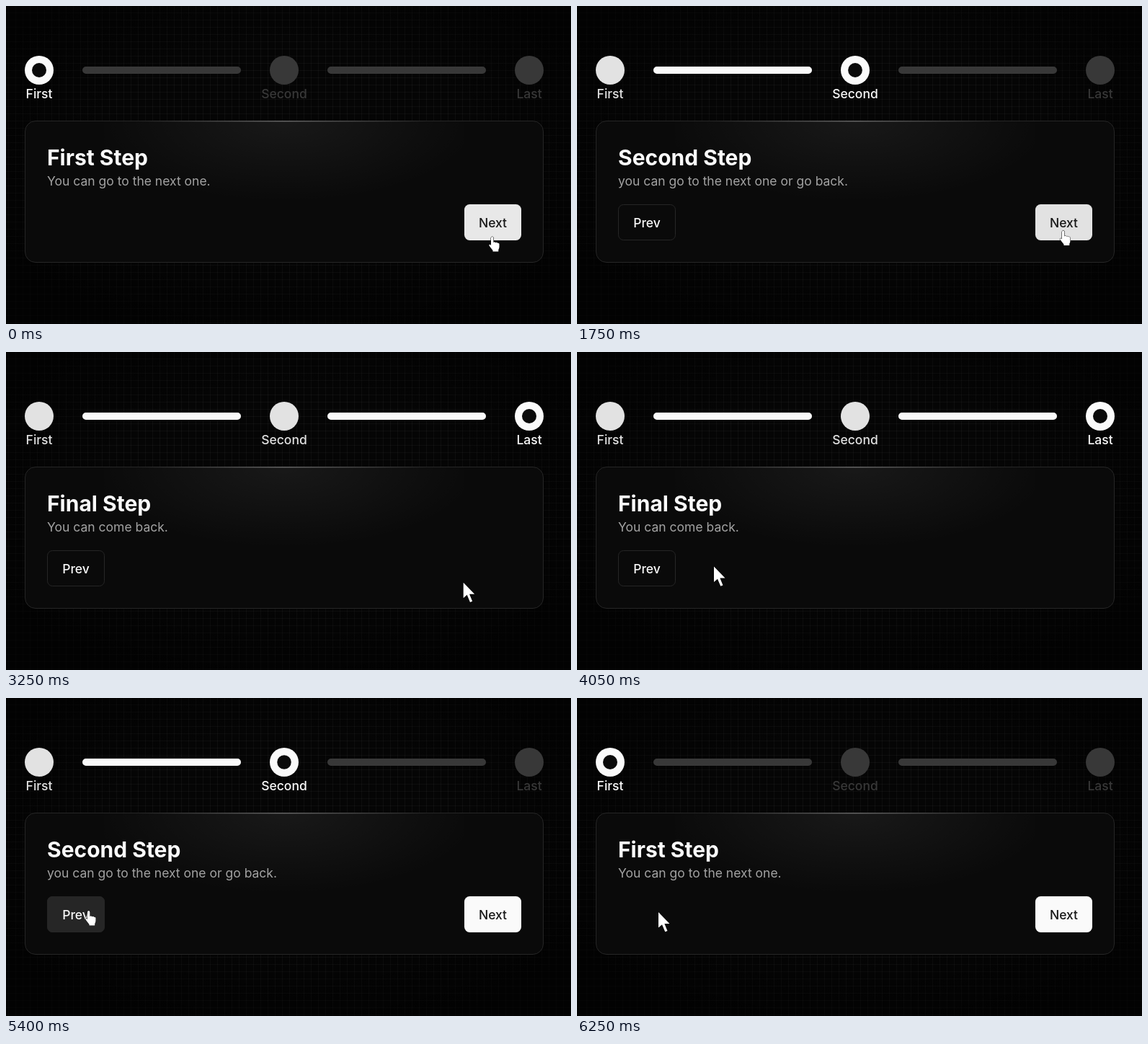
An HTML page that plays this animation: 784 px wide and 441 px high, repeating every 6.3 s.

```html
<!DOCTYPE html>
<html lang="en">
<head>
<meta charset="utf-8">
<title>Stepper</title>
<style>
html, body { margin: 0; width: 100%; height: 100%; overflow: hidden; background: #050505; }
svg { display: block; width: 784px; height: 441px; }
text { font-family: Inter, sans-serif; font-size: 17.5px; white-space: pre; }
.label { text-anchor: middle; font-weight: 500; }
.button text { text-anchor: middle; font-weight: 500; }
#title { font-size: 30px; font-weight: 700; fill: #fafafa; }
#sub { fill: #a3a3a3; }
#cursor path { fill: #fff; stroke: #000; stroke-width: 1; stroke-linejoin: round; paint-order: stroke; }
</style>
</head>
<body>
<svg viewBox="0 0 784 441">
  <defs>
    <pattern id="grid" width="10" height="10" patternUnits="userSpaceOnUse">
      <path d="M3.5 0V10M0 9.5H10" stroke="#fff" stroke-opacity=".035"/>
    </pattern>
    <radialGradient id="shade" cx=".5" cy=".45" r=".62">
      <stop offset=".5" stop-color="#000" stop-opacity="0"/>
      <stop offset="1" stop-color="#000" stop-opacity=".65"/>
    </radialGradient>
    <radialGradient id="glow" gradientUnits="userSpaceOnUse" cx="0" cy="0" r="1"
      gradientTransform="translate(386 160) scale(270 112)">
      <stop offset="0" stop-color="#fff" stop-opacity=".06"/>
      <stop offset="1" stop-color="#fff" stop-opacity="0"/>
    </radialGradient>
    <linearGradient id="shine">
      <stop offset="0" stop-color="#fff" stop-opacity="0"/>
      <stop offset=".5" stop-color="#fff" stop-opacity=".3"/>
      <stop offset="1" stop-color="#fff" stop-opacity="0"/>
    </linearGradient>
    <clipPath id="tracks">
      <rect x="106" y="84" width="220" height="10" rx="5"/>
      <rect x="446" y="84" width="220" height="10" rx="5"/>
    </clipPath>
  </defs>

  <rect width="784" height="441" fill="#050505"/>
  <rect width="784" height="441" fill="url(#grid)"/>
  <rect width="784" height="441" fill="url(#shade)"/>

  <g clip-path="url(#tracks)">
    <path d="M106 89H326M446 89H666" stroke="#383838" stroke-width="10"/>
    <rect class="fill" x="106" y="84" height="10" fill="#fafafa"/>
    <rect class="fill" x="446" y="84" height="10" fill="#fafafa"/>
  </g>
  <g id="steps"></g>

  <rect x="26.5" y="159.5" width="719" height="196" rx="14.5" fill="#0a0a0a" stroke="#262626"/>
  <rect x="136" y="160" width="500" height="112" fill="url(#glow)"/>
  <rect x="186" y="159" width="400" height="1.5" fill="url(#shine)"/>

  <g id="content">
    <text id="title" x="57" y="221"></text>
    <text id="sub" x="57" y="249"></text>
  </g>

  <g id="prev" class="button">
    <rect x="57.5" y="275.5" width="79" height="49" rx="7" fill="#0a0a0a" stroke="#262626"/>
    <rect id="hover" x="57" y="275" width="80" height="50" rx="7.5" fill="#262626"/>
    <text x="97" y="307" fill="#fafafa">Prev</text>
  </g>
  <g id="next" class="button">
    <rect id="face" x="636" y="275" width="79" height="50" rx="7.5"/>
    <text x="675.5" y="307" fill="#171717">Next</text>
  </g>

  <g id="cursor">
    <path id="arrow" d="M0 0V21.5L5 17.2L9.3 27.3L12.5 26L8.4 16H15.5Z"/>
    <g id="hand" transform="translate(-3 -2)">
      <path d="M3 2q0-2 1.7-2t1.7 2V8q1.5-1.5 3 .2q1.6-1 2.8.6q1.8-.6 2.3 1.2V14q0 2-1.2 4V20.5H5.5V19L2 14.5L.3 12q0-1.6 1.5-1.3L3 12Z"/>
    </g>
  </g>
</svg>
<script>
const LOOP = 6300, FRAME = 50;
const CLICKS = [1118, 2065, 4720, 5645];
const ORDER = [0, 1, 2, 1, 0];
const CENTERS = [46, 386, 726];
const NAMES = ["First", "Second", "Last"];
const TEXTS = [
  ["First Step", "You can go to the next one."],
  ["Second Step", "you can go to the next one or go back."],
  ["Final Step", "You can come back."]
];
// Cursor way points: time, x, y
const PATH = [
  [50, 673, 322], [150, 672, 312], [1250, 672, 312], [1600, 673, 313.5], [3000, 673, 313.5],
  [3150, 660, 317], [3300, 622, 321], [3450, 559, 322], [3600, 470, 319],
  [3750, 377, 310], [3900, 283, 301], [4050, 190, 297.5], [4150, 148, 297.5],
  [4250, 126, 297.5], [4350, 114, 297.5], [4400, 113, 297]
];

const $ = id => document.getElementById(id);
const clamp = v => Math.min(1, Math.max(0, v));
const mix = (a, b, p) => a + (b - a) * p;
const ramp = (t, from, length) => clamp((t - from) / length);
const ease = p => p < .5 ? 2 * p * p : 1 - 2 * (1 - p) * (1 - p);
const gray = v => `rgb(${v},${v},${v})`;
const show = (el, on) => el.style.display = on ? "" : "none";

// Spring with stiffness 100 and damping 10
function spring(ms) {
  const s = ms / 1000, w = Math.sqrt(75) * s;
  return 1 - Math.exp(-5 * s) * (Math.cos(w) + Math.sin(w) / Math.sqrt(3));
}

$("steps").innerHTML = CENTERS.map((x, i) => `<circle class="disc" cx="${x}" cy="89" r="20"/>
  <circle class="dot" cx="${x}" cy="89" fill="#0a0a0a"/>
  <text class="label" x="${x}" y="128">${NAMES[i]}</text>`).join("");
const discs = document.querySelectorAll(".disc");
const dots = document.querySelectorAll(".dot");
const labels = document.querySelectorAll(".label");
const fills = document.querySelectorAll(".fill");

const level = (i, step) => i === step ? 250 : i < step ? 226 : 56;

function cursorAt(t) {
  const k = PATH.findIndex(p => p[0] > t);
  if (k === 0) return PATH[0].slice(1);
  if (k < 0) return PATH[PATH.length - 1].slice(1);
  const a = PATH[k - 1], b = PATH[k], p = ramp(t, a[0], b[0] - a[0]);
  return [mix(a[1], b[1], p), mix(a[2], b[2], p)];
}

function render(t) {
  const n = CLICKS.filter(c => c <= t).length;
  const step = ORDER[n], last = n ? ORDER[n - 1] : step;
  const age = n ? t - CLICKS[n - 1] : 1e5;
  const leave = ease(ramp(age, 0, 200)), enter = ease(ramp(age, 200, 200));
  const tint = ramp(age, 0, 100);

  CENTERS.forEach((_, i) => {
    const color = gray(mix(level(i, last), level(i, step), tint));
    discs[i].setAttribute("fill", color);
    labels[i].setAttribute("fill", color);
    const size = i === step ? spring(age) : i === last ? 1 - leave : 0;
    dots[i].setAttribute("r", 10 * Math.max(0, size));
  });
  fills.forEach((bar, i) =>
    bar.setAttribute("width", 220 * mix(last > i ? 1 : 0, step > i ? 1 : 0, leave)));

  const leaving = age < 200;
  const [title, sub] = TEXTS[leaving ? last : step];
  $("title").textContent = title;
  $("sub").textContent = sub;
  $("content").setAttribute("opacity", leaving ? 1 - leave : enter);
  $("content").setAttribute("transform",
    `translate(0 ${leaving ? -13 * leave : 13 * (1 - enter)})`);

  show($("prev"), step > 0);
  show($("next"), step < 2);
  $("hover").setAttribute("opacity", ramp(t, 4240, 150));
  $("face").setAttribute("fill", gray(n < 2 ? mix(232, 226, ramp(t, 0, 100)) : 250));

  const pointing = n < 2 || (t >= 4230 && n < 4);
  show($("hand"), pointing);
  show($("arrow"), !pointing);
  $("cursor").setAttribute("transform", `translate(${cursorAt(t)})`);
}

const start = performance.now();
function tick() {
  const t = (performance.now() - start) % LOOP;
  render(Math.floor(t / FRAME) * FRAME);
  requestAnimationFrame(tick);
}
tick();
</script>
</body>
</html>
```
